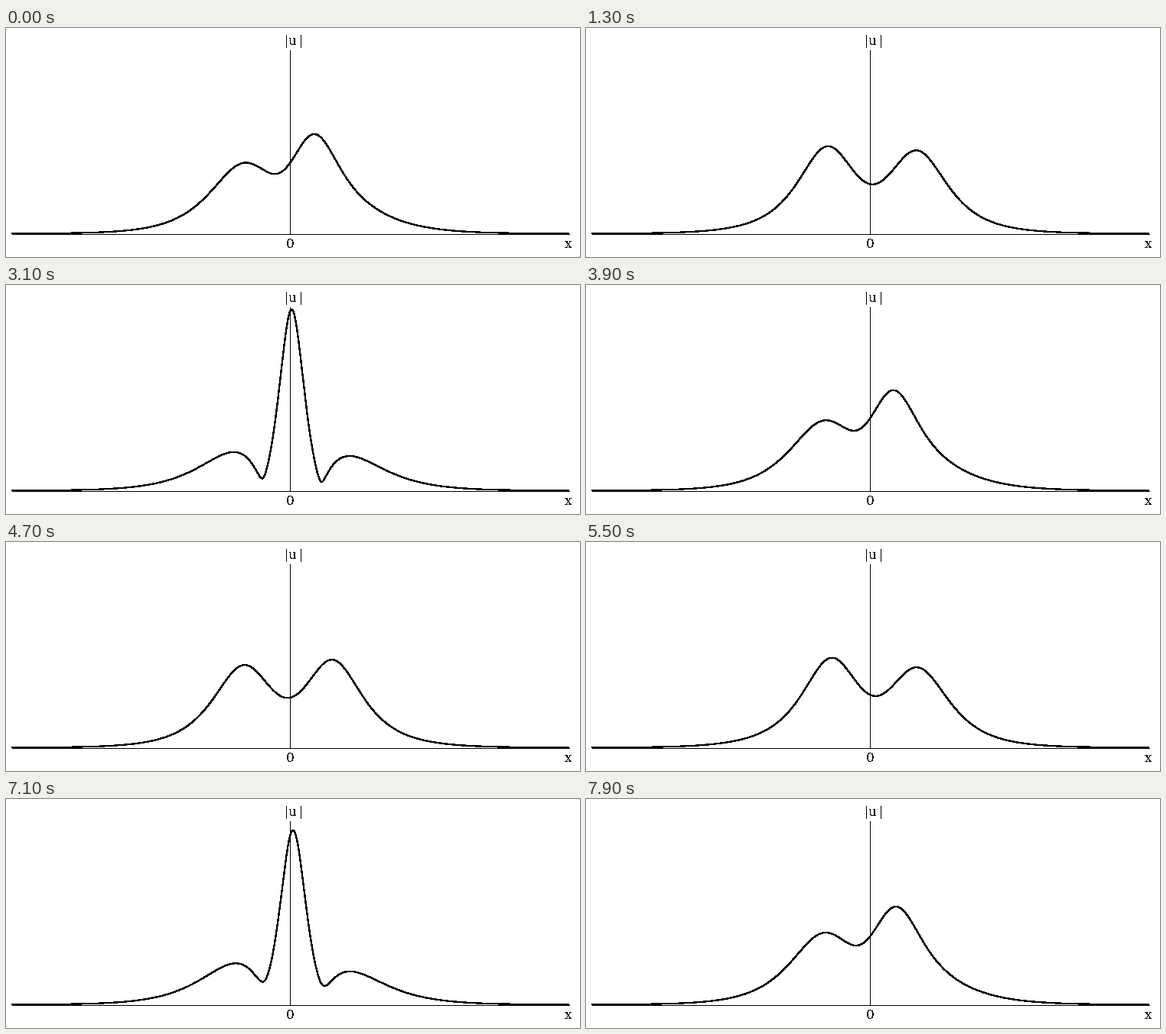
These frames come from a looping animation (750x300 px, 8 s). A matplotlib script:

```python
import numpy as np
import matplotlib.pyplot as plt
from matplotlib.animation import FuncAnimation

W, H, DPI = 750, 300, 100
FRAMES, STEP = 80, 100          # step in ms
PX = 72 / DPI                   # one pixel in points

# Two bound solitons: amplitudes 1 and A2, wavenumber gap GAP
A2, GAP = 0.58, 0.247
S, D = 1 + A2, 1 - A2
R = (S**2 + GAP**2) / (D**2 + GAP**2)
M = R - 1

PERIOD, WIDEST = 3926, 1068     # ms
X0, Y0 = 371.6, 269.4
X_SCALE, Y_SCALE = 24.9, 152    # pixels per unit

plt.rcParams["text.antialiased"] = False
plt.rcParams["font.family"] = "DejaVu Serif"

fig = plt.figure(figsize=(W / DPI, H / DPI), dpi=DPI, facecolor="white")
ax = fig.add_axes([0, 0, 1, 1])
ax.set_xlim(0, W)
ax.set_ylim(H, 0)
ax.axis("off")


def segment(xs, ys):
    ax.plot(xs, ys, color="black", lw=PX, antialiased=False,
            solid_capstyle="butt")


def label(x, y, s):
    ax.text(x, y, s, fontsize=17 * PX, color="black",
            ha="center", va="baseline")


segment([8, 736], [269.5, 269.5])
segment([370.5, 370.5], [29, 270])
for bar in (365.5, 384.5):
    segment([bar, bar], [9, 25])
label(375.5, 22, "u")
label(371, 288, "0")
label(734.5, 288, "x")

px = np.linspace(8, 735, 1455)
x = (px - X0) / X_SCALE
curve, = ax.plot([], [], color="black", lw=1.3 * PX, antialiased=False)


def envelope(t):
    """|u| from the second log-derivative of the tau function."""
    arg = GAP * x - 2 * np.pi * (t - WIDEST) / PERIOD
    f = np.cosh(S * x) + R * np.cosh(D * x) + M * np.cos(arg)
    f1 = S * np.sinh(S * x) + R * D * np.sinh(D * x) - M * GAP * np.sin(arg)
    f2 = (S**2 * np.cosh(S * x) + R * D**2 * np.cosh(D * x)
          - M * GAP**2 * np.cos(arg))
    return np.sqrt(np.maximum(f2 / f - (f1 / f)**2, 0))


def update(i):
    curve.set_data(px, Y0 - Y_SCALE * envelope(i * STEP))
    return curve,


anim = FuncAnimation(fig, update, frames=FRAMES, interval=STEP,
                     repeat=True, repeat_delay=0)
plt.show()
```
